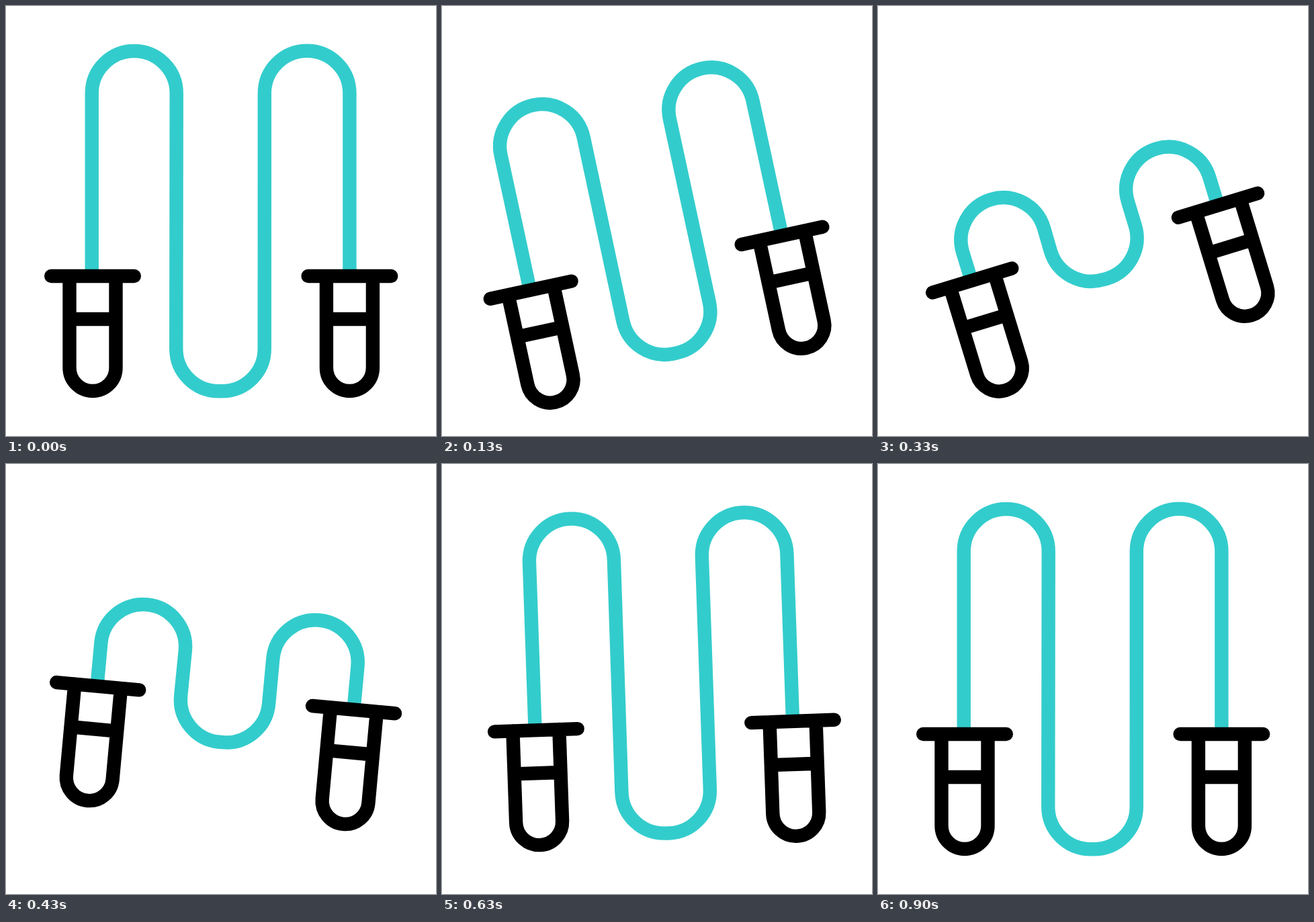
Recreate the animation shown at these times as an HTML page with a canvas. Size 640x640 px, loop 1670 ms.

```html
<!DOCTYPE html>
<html lang="en">
<head>
<meta charset="utf-8">
<title>Skipping rope</title>
<style>
  html, body { margin: 0; width: 100%; height: 100%; overflow: hidden; background: #fff; }
  canvas { display: block; width: 100vw; height: 100vh; }
</style>
</head>
<body>
<canvas id="stage" width="640" height="640"></canvas>
<script>
const ctx = document.getElementById('stage').getContext('2d');
const LOOP = 1670, FPS = 30, CENTER = 320;
const ROPE = '#33cccc', GRIP = '#000';

// Keys are [tick, value], eased in and out between neighbours.
const ANGLE = [[0, 0], [8, -24.4], [14.9, 12], [21, -6.7], [27, 0]];
const SLACK = [[0.2, 0], [10.95, 1], [20.9, 0]];

// Path of the centre: three curved legs back to the start.
const LEGS = [
  [0, 8, 'M0 0C0 0 -35.2 -30.6 -31 -39.2'],
  [8, 14.9, 'M-31 -39.2C-26.8 -47.8 19.8 -58 25 -51.5'],
  [14.9, 21, 'M25 -51.5C30.2 -45 0 0 0 0']
].map(([from, to, d]) => {
  const path = document.createElementNS('http://www.w3.org/2000/svg', 'path');
  path.setAttribute('d', d);
  return { from, to, path, length: path.getTotalLength() };
});

const clamp = x => Math.min(1, Math.max(0, x));
const ease = x => x * x * (3 - 2 * x);

function track(keys, tick) {
  let value = keys[0][1];
  for (let i = 1; i < keys.length; i++) {
    const [t0, v0] = keys[i - 1], [t1, v1] = keys[i];
    if (tick > t0) value = v0 + (v1 - v0) * ease(clamp((tick - t0) / (t1 - t0)));
  }
  return value;
}

function position(tick) {
  const leg = LEGS.find(l => tick < l.to);
  if (!leg) return { x: 0, y: 0 };
  const p = ease((tick - leg.from) / (leg.to - leg.from));
  return leg.path.getPointAtLength(p * leg.length);
}

function line(x0, y0, x1, y1) {
  ctx.moveTo(x0, y0);
  ctx.lineTo(x1, y1);
}

function drawRope(slack) {
  const top = 130 + 233 * slack, low = 510 - 118 * slack;
  ctx.strokeStyle = ROPE;
  ctx.lineCap = 'butt';
  ctx.beginPath();
  ctx.moveTo(127.75, 402);
  ctx.arc(190.75, top, 63, Math.PI, 0);
  ctx.lineTo(253.25, low);
  ctx.arc(316.5, low, 63.25, Math.PI, Math.PI / 2, true);
  ctx.arc(321.5, low, 63.25, Math.PI / 2, 0, true);
  ctx.arc(448.1, top, 63.3, Math.PI, 0);
  ctx.lineTo(511.4, 402);
  ctx.stroke();
}

function drawHandle(x) {
  ctx.strokeStyle = GRIP;
  ctx.lineCap = 'round';
  ctx.beginPath();
  line(x - 61.8, 402, x + 61.8, 402);
  line(x - 34.5, 466, x + 34.5, 466);
  ctx.moveTo(x - 34.5, 402);
  ctx.arc(x, 538.5, 34.5, Math.PI, 0, true);
  ctx.lineTo(x + 34.5, 402);
  ctx.stroke();
}

function draw(tick) {
  const { x, y } = position(tick);
  ctx.setTransform(1, 0, 0, 1, 0, 0);
  ctx.fillStyle = '#fff';
  ctx.fillRect(0, 0, 640, 640);
  ctx.translate(CENTER + x, CENTER + y);
  ctx.rotate(track(ANGLE, tick) * Math.PI / 180);
  ctx.translate(-CENTER, -CENTER);
  ctx.lineWidth = 20.4;
  drawRope(track(SLACK, tick));
  drawHandle(129);
  drawHandle(511.4);
}

const start = performance.now();
function frame() {
  const ms = (performance.now() - start) % LOOP;
  draw(Math.floor((ms + 5) * FPS / 1000));
  requestAnimationFrame(frame);
}
frame();
</script>
</body>
</html>
```
